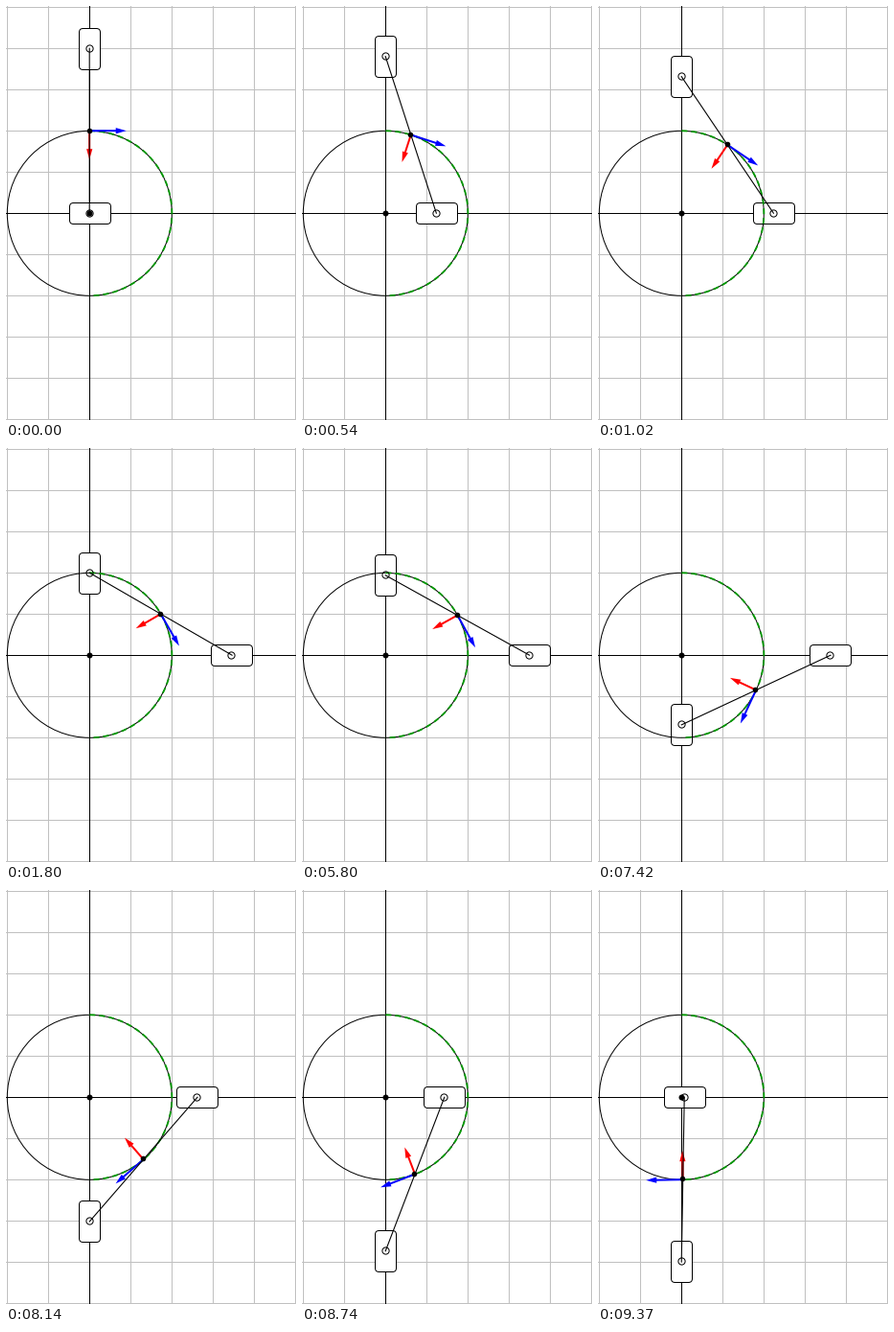
A matplotlib script for the animation above (9.4 s loop, 303x432 px).

```python
import numpy as np
import matplotlib.pyplot as plt
from matplotlib.animation import FuncAnimation
from matplotlib.patches import Circle, FancyBboxPatch, Polygon

W, H, DPI = 303, 432, 64
OX, OY = 87, 216          # centre of the trammel
UNIT = 43                 # grid cell
R = 2 * UNIT              # traced circle
ROD = 4 * UNIT
LOOP, TICK = 9400, 20     # ms
PX = 72 / DPI             # points per pixel

fig = plt.figure(figsize=(W / DPI, H / DPI), dpi=DPI, facecolor="white")
ax = fig.add_axes([0, 0, 1, 1])
ax.set_xlim(0, W)
ax.set_ylim(H, 0)
ax.axis("off")


def line(x, y, z, color="black", width=1, **kw):
    return ax.plot(x, y, color=color, lw=width * PX, zorder=z, **kw)[0]


def disc(x, y, r, z, fill="black", edge="none"):
    return ax.add_patch(Circle((x, y), r, fc=fill, ec=edge, lw=PX, zorder=z))


def slider(w, h):
    box = FancyBboxPatch((OX - w / 2, OY - h / 2), w, h,
                         boxstyle="round,pad=0,rounding_size=4",
                         fc="white", ec="black", lw=PX, zorder=3, snap=True)
    return ax.add_patch(box)


def arrow_shape(start, direction, length):
    """Outline of an arrow with a 2 px shaft."""
    d = np.array(direction)
    n = np.array([-d[1], d[0]])
    neck = length - 11
    along = np.array([0, neck, neck, length, neck, neck, 0])
    side = np.array([-1, -1, -3.1, 0, 3.1, 1, 1])
    return start + np.outer(along, d) + np.outer(side, n)


def pixel(x, y):
    return np.floor([x, y]) + 0.5


# Grid as one broken line
gx, gy = [], []
for x in np.arange(0, 302, UNIT) + 0.5:
    gx += [x, x, np.nan]
    gy += [0, 431, np.nan]
for y in np.arange(0, 431, UNIT) + 0.5:
    gx += [0, 302, np.nan]
    gy += [y, y, np.nan]
line(gx, gy, 1, "#c0c0c0", snap=True)
line([0, 302], [OY - 0.5] * 2, 2, snap=True)
line([OX - 0.5] * 2, [0, 431], 2, snap=True)

# Circle and the dashed path on its right half
disc(OX + 0.3, OY + 0.3, R, 4, "none", "black")
arc = np.linspace(0, np.pi, 181)
line(OX + 0.4 + R * np.sin(arc), OY + 0.3 - R * np.cos(arc), 5, "#009900",
     1.8, ls=(0, (6 / 1.8, 4 / 1.8)), dash_capstyle="butt")

box_v = slider(UNIT / 2, UNIT)
box_h = slider(UNIT, UNIT / 2)
red = ax.add_patch(Polygon(np.zeros((3, 2)), fc="red", ec="none", zorder=6))
blue = ax.add_patch(Polygon(np.zeros((3, 2)), fc="blue", ec="none", zorder=7))
rod = line([], [], 8, width=1.1, snap=False)
hole_v = disc(OX, OY, 3.6, 9, "none", "black")
hole_h = disc(OX, OY, 3.6, 9, "none", "black")
disc(OX + 0.5, OY + 0.5, 3, 9)
pen = disc(OX, OY, 2.8, 9)


def degrees(t):
    """One degree per 30 ms, with a 4 s rest at 60 degrees."""
    if t < 5800:
        return min(t // 30, 60)
    return 61 + (t - 5800) // 30


def draw(k):
    a = np.radians(degrees(k * TICK)) * (1 + 1e-6)
    s, c = np.sin(a), np.cos(a)
    hx, vy = OX + ROD * s, OY - ROD * c + 1e-6
    mid = np.array([OX + R * s, OY - R * c + 1e-6])

    box_v.set_y(vy - UNIT / 2)
    box_h.set_x(hx - UNIT / 2)
    hole_v.center = pixel(OX, vy)
    hole_h.center = pixel(hx, OY)
    pen.center = pixel(*mid)
    rod.set_data([OX + 0.2, hx + 0.2], [vy + 0.2, OY + 0.2])
    red.set_xy(arrow_shape(mid + 0.2, (-s, c), 30))
    blue.set_xy(arrow_shape(mid + 0.2, (c, s), 38.5))
    return box_v, box_h, red, blue, rod, hole_v, hole_h, pen


anim = FuncAnimation(fig, draw, frames=LOOP // TICK, interval=TICK,
                     repeat=True, repeat_delay=0, init_func=lambda: draw(0))
plt.show()
```
